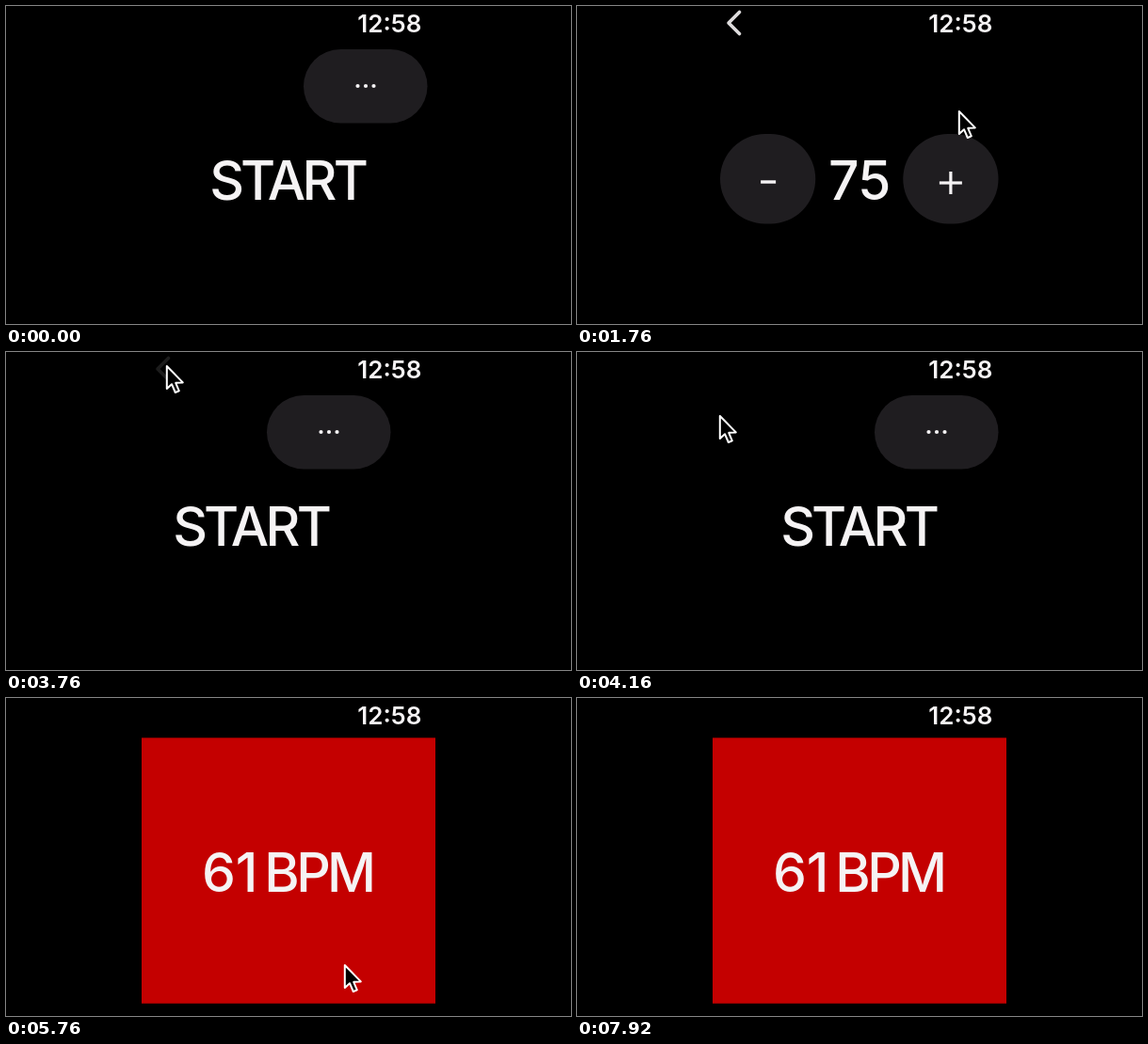
Write an HTML page with a canvas that moves like this. It is 600 px wide and 338 px high and loops after 8000 ms.

```html
<!DOCTYPE html>
<html lang="en">
<head>
<meta charset="utf-8">
<title>Watch heart rate demo</title>
<style>
html, body { margin: 0; width: 100%; height: 100%; overflow: hidden; background: #000; }
canvas { display: block; width: 100vw; height: 100vh; filter: blur(0.5px); }
</style>
</head>
<body>
<canvas id="stage" width="600" height="338"></canvas>
<script>
const ctx = document.getElementById('stage').getContext('2d');
const LOOP = 8000, TICK = 80;
const LEFT = 144, RIGHT = 456, WIDTH = RIGHT - LEFT, HEIGHT = 338;
const CX = 300, CY = 184, BASELINE = 206;
const INK = '#f5f3f4', BUTTON = '#1f1d20', RED = '#c40000';

const BIG = { size: 57, weight: 450, tracking: 0 };
const TIGHT = { ...BIG, tracking: -3.6 };
const CLOCK = { size: 26, weight: 600, tracking: 0 };

// The pointer rests between moves.
const SHOW = 1120, HIDE = 7920;
const HOME = { x: 404, y: 89 };
const MOVES = [
  { from: 1680, to: 1760, x: 405, y: 111 },
  { from: 1760, to: 2240, x: 210, y: 176 },
  { from: 2480, to: 3040, x: 207, y: 168 },
  { from: 3040, to: 3520, x: 170, y: 14 },
  { from: 4000, to: 4160, x: 151, y: 67 },
  { from: 4160, to: 4320, x: 148, y: 130 },
  { from: 4320, to: 4720, x: 241, y: 182 },
  { from: 5440, to: 5760, x: 359, y: 283 },
  { from: 5760, to: 6240, x: 438, y: 306 },
  { from: 6320, to: 7040, x: 432, y: 277 },
  { from: 7520, to: 7840, x: 439, y: 294 }
];

const clamp = v => Math.min(1, Math.max(0, v));
const mix = (a, b, k) => a + (b - a) * k;
const easeOut = (t, start, length, power) =>
  1 - Math.pow(1 - clamp((t - start) / length), power);

function pointerAt(t) {
  let { x, y } = HOME;
  for (const move of MOVES) {
    const k = clamp((t - move.from) / (move.to - move.from));
    x = mix(x, move.x, k);
    y = mix(y, move.y, k);
  }
  return [x, y];
}

function measure(text, { size, weight, tracking }) {
  ctx.font = `${weight} ${size}px Inter, Roboto, sans-serif`;
  ctx.letterSpacing = tracking + 'px';
  const m = ctx.measureText(text);
  const inset = m.actualBoundingBoxLeft;
  return { inset, width: m.actualBoundingBoxRight + inset - tracking * 0 };
}

// Places text by the left edge of its ink.
function label(text, left, baseline, style) {
  const { inset } = measure(text, style);
  ctx.fillStyle = INK;
  ctx.fillText(text, left + inset, baseline);
}

function centred(text, x, baseline, style) {
  label(text, x - measure(text, style).width / 2, baseline, style);
}

function pill(x, y, w, h) {
  ctx.fillStyle = BUTTON;
  ctx.beginPath();
  ctx.roundRect(x, y, w, h, h / 2);
  ctx.fill();
}

function bar(x, y, w, h) {
  ctx.fillStyle = INK;
  ctx.fillRect(x - w / 2, y - h / 2, w, h);
}

function startView() {
  pill(316, 46, 131.5, 78.5);
  ctx.fillStyle = INK;
  for (let i = -1; i <= 1; i++) {
    ctx.beginPath();
    ctx.arc(382 + i * 8.5, 85, 2.1, 0, Math.PI * 2);
    ctx.fill();
  }
  centred('START', 300.5, BASELINE, TIGHT);
}

// The two buttons share the space the number leaves free.
function limitView(value) {
  const text = String(value);
  const start = 152, end = 447.5, gap = 15.5;
  const w = (end - start - measure(text, BIG).width) / 2 - gap;
  pill(start, 136, w, 95.5);
  pill(end - w, 136, w, 95.5);
  bar(start + w / 2 + 0.5, 187, 16, 3.4);
  bar(end - w / 2, 188, 24, 3.2);
  bar(end - w / 2, 188, 3.2, 24);
  centred(text, CX, BASELINE, BIG);
}

function rateView(rate) {
  const text = String(rate), gap = 14.5;
  const digits = measure(text, BIG).width;
  const unit = measure('BPM', TIGHT).width;
  const left = CX - (digits + gap + unit) / 2;
  ctx.fillStyle = RED;
  ctx.fillRect(CX - 161, 42.3, 322, 282.4);
  label(text, left, BASELINE, BIG);
  label('BPM', left + digits + gap, BASELINE, TIGHT);
}

// e = 0 shows the front view in place, e = 1 shows the back view.
function transition(front, back, e) {
  ctx.save();
  ctx.beginPath();
  ctx.rect(LEFT, 0, WIDTH, HEIGHT);
  ctx.clip();

  if (e > 0) {
    const scale = mix(0.77, 1, e);
    ctx.save();
    ctx.translate(CX, CY);
    ctx.scale(scale, scale);
    ctx.translate(-CX, -CY);
    back();
    ctx.restore();
    // A black veil dims the whole view evenly.
    ctx.fillStyle = `rgba(0, 0, 0, ${1 - Math.pow(e, 1.42)})`;
    ctx.fillRect(LEFT, 0, WIDTH, HEIGHT);
  }

  if (e < 1) {
    ctx.translate(-WIDTH * e, 0);
    ctx.fillStyle = '#000';
    ctx.fillRect(LEFT, 0, WIDTH + 6, HEIGHT);
    front();
  }
  ctx.restore();
}

function chevron(alpha) {
  ctx.save();
  ctx.globalAlpha = alpha;
  ctx.strokeStyle = '#dedcdd';
  ctx.lineWidth = 3.6;
  ctx.lineCap = ctx.lineJoin = 'round';
  ctx.beginPath();
  ctx.moveTo(172.5, 6.5);
  ctx.lineTo(161, 18);
  ctx.lineTo(172.5, 29.5);
  ctx.stroke();
  ctx.restore();
}

const ARROW = new Path2D('M0 0V24L5.2 19.2L9 28L13 26.3L9.4 17.8L17 17.4Z');

function pointer(x, y) {
  ctx.save();
  ctx.translate(x + 0.8, y + 1);
  ctx.fillStyle = '#000';
  ctx.fill(ARROW);
  ctx.strokeStyle = '#fff';
  ctx.lineWidth = 2;
  ctx.lineJoin = 'round';
  ctx.stroke(ARROW);
  ctx.restore();
}

function draw(t) {
  ctx.fillStyle = '#000';
  ctx.fillRect(0, 0, 600, HEIGHT);

  if (t < 4800) {
    const value = t < 2400 ? 75 : t < 2720 ? 70 : 65;
    const e = easeOut(t, 1040, 560, 5.5) - easeOut(t, 3600, 320, 3);
    transition(startView, () => limitView(value), e);
    chevron(e);
  } else {
    const rate = t < 5600 ? 59 : 61;
    transition(startView, () => rateView(rate), easeOut(t, 4800, 560, 5.5));
  }

  centred('12:58', 407.5, 28, CLOCK);
  if (t >= SHOW && t < HIDE) pointer(...pointerAt(t));
}

function loop() {
  const t = performance.now() % LOOP;
  draw(Math.floor(t / TICK) * TICK);
  requestAnimationFrame(loop);
}
loop();
</script>
</body>
</html>
```
